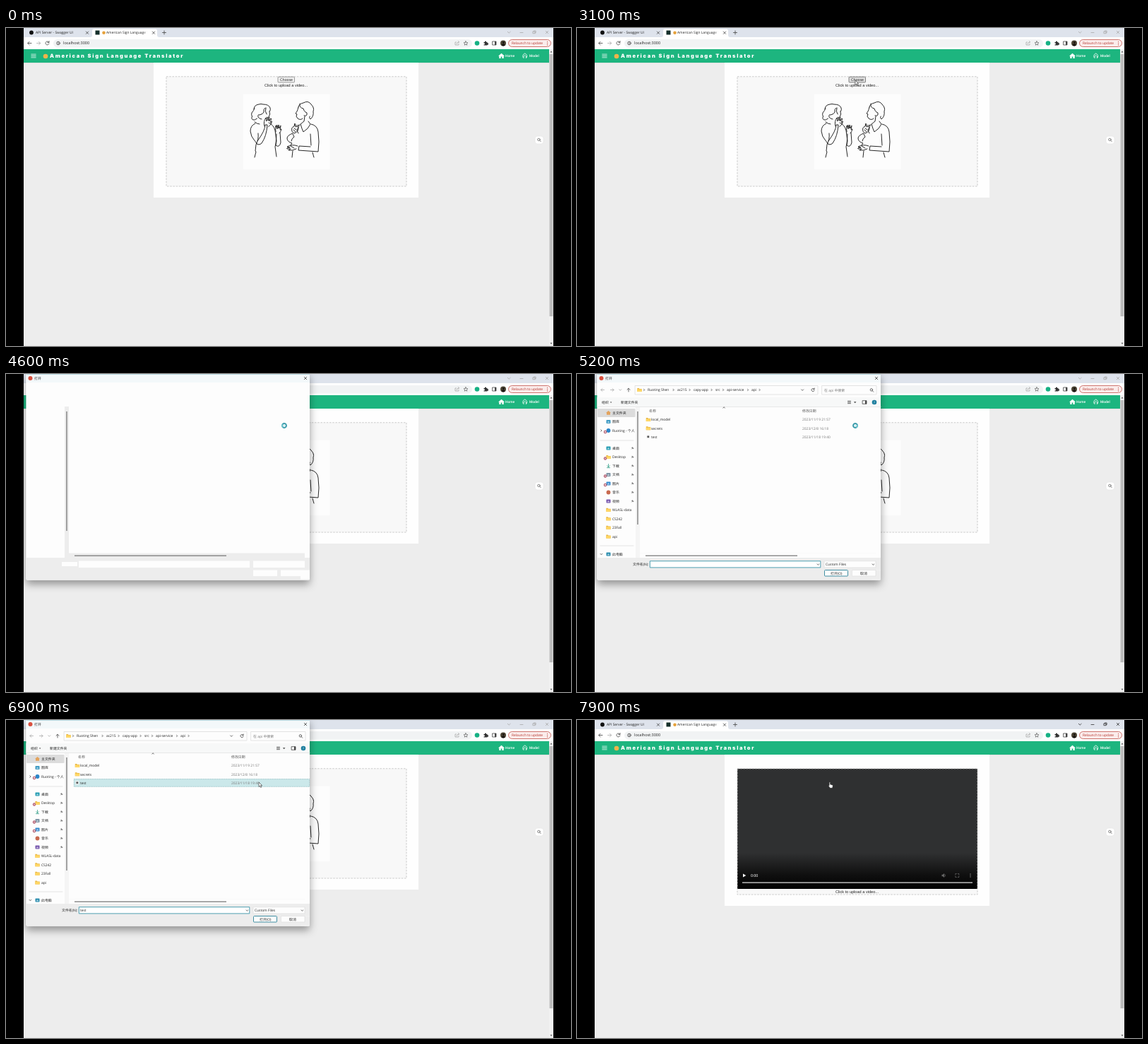
These frames come from a looping animation (800 px wide and 450 px high, 8000 ms). An HTML page:

```html
<!DOCTYPE html>
<html lang="en">
<head>
<meta charset="utf-8">
<title>Sign language translator upload</title>
<style>
  html, body { margin: 0; width: 100%; height: 100%; overflow: hidden; background: #000; }
  svg { display: block; width: 800px; height: 450px; }
  text { font: 4.9px "Open Sans", "Noto Sans CJK SC", "Noto Sans CJK", sans-serif; fill: #222; text-rendering: geometricPrecision; }
  .arial { font-family: "Liberation Sans", sans-serif; }
  .roboto { font-family: Roboto, sans-serif; }
  .line { fill: none; stroke: #444; stroke-width: .8; stroke-linecap: round; stroke-linejoin: round; }
  .dim { stroke: #aaa; }
  .white { stroke: #fff; }
  .dashed { fill: none; stroke: #c6c6c6; stroke-width: .9; stroke-dasharray: 2.6 1.6; }
  #sketch { stroke: #1c1c1c; stroke-width: .95; }
  #controls.active { stroke: #333; }
  #button { fill: #efefef; stroke: #777; stroke-width: .7; }
  #button.hover { fill: #dedede; stroke: #555; }
  #rows .date { fill: #777; }
</style>
</head>
<body>
<svg viewBox="0 0 800 450">
  <defs>
    <linearGradient id="shade" x2="0" y2="1">
      <stop offset=".7" stop-color="#2f3031"/><stop offset=".88" stop-color="#101010"/><stop offset="1" stop-color="#000"/>
    </linearGradient>
    <linearGradient id="fade" x2="1" y2="0">
      <stop stop-color="#fff" stop-opacity="0"/><stop offset=".6" stop-color="#fff"/>
    </linearGradient>
    <filter id="shadow" x="-10%" y="-10%" width="120%" height="125%">
      <feDropShadow dx="0" dy="6" stdDeviation="6" flood-opacity=".38"/>
    </filter>
    <clipPath id="screen"><path d="M25 0h750v450H25z"/></clipPath>
    <clipPath id="side"><path d="M29 46h54v214H29z"/></clipPath>
    <path id="close" d="M-1.7-1.7 1.7 1.7M1.7-1.7-1.7 1.7"/>
    <g id="folder"><path d="M-3.2-2.5h2.4l.8.9h3.2v4.1h-6.4z" fill="#e9b949"/><path d="M-3.2-.9h6.4v3.4h-6.4z" fill="#ffd766"/></g>
    <g id="lens"><circle cx="-.6" cy="-.6" r="1.7"/><path d="M.7.7 2.3 2.3"/></g>
  </defs>

  <g clip-path="url(#screen)">
    <path d="M25 0h750v450H25z" fill="#ededed"/>

    <!-- browser frame -->
    <path d="M25 0h750v14H25z" fill="#dee3ec"/>
    <path d="M25 13h750v17H25z" fill="#fff"/>
    <path d="M119 13q3 0 3-3V4q0-2.500 2.500-2.500h87q2.500 0 2.500 2.500v6q0 3 3 3z" fill="#fff"/>
    <circle cx="36" cy="6.500" r="2.900" fill="#111"/>
    <text x="42" y="8.400" font-size="5" id="tab1">API Server - Swagger UI</text>
    <path d="M126.500 3.500h6v6h-6z" fill="#16302b"/>
    <circle cx="138.500" cy="6.700" r="2.300" fill="#e6a23c"/>
    <text x="142" y="8.400">American Sign Language T</text>
    <path d="M194 3h11v8h-11z" fill="url(#fade)"/>
    <g class="line">
      <use href="#close" x="115" y="6.700"/><use href="#close" x="209" y="6.700"/>
      <path d="M221.500 6.500h5M224 4v5"/>
      <path d="M36 21.500h-5.200m2.300-2.300-2.300 2.300 2.300 2.300"/>
      <path class="dim" d="M43.500 21.500h5.200m-2.300-2.300 2.300 2.300-2.300 2.300"/>
      <path d="M60.700 20.200a2.500 2.500 0 1 0 .2 2M61 18.500v2h-2"/>
    </g>
    <rect x="67" y="16" width="593" height="11.500" rx="5.700" fill="#f1f3f4"/>
    <g class="line"><circle cx="74" cy="21.500" r="2.300"/><path d="M74 21.300v1.200M74 20.200v.1"/></g>
    <text x="81" y="23.400" style="font-size:5.500px">localhost:3000</text>
    <g class="line">
      <path class="dim" d="M637.500 20h-1.500v4h5v-1.500M638 22.500q.5-2.700 3.500-2.700m-1.300-1.300 1.400 1.300-1.400 1.300"/>
      <path d="M651 18.700l.85 1.900 2.050.2-1.550 1.400.45 2-1.800-1.050-1.800 1.050.45-2-1.550-1.400 2.050-.2z" stroke-width=".6"/>
      <path d="M689 19h5v5h-5z"/>
    </g>
    <path d="M692 19h2v5h-2z" fill="#444"/>
    <circle cx="667" cy="21.500" r="3.300" fill="#16b184"/>
    <path d="M676.500 20h1.500a1.100 1.100 0 1 1 2 0h1.500v1.500a1.100 1.100 0 1 1 0 2v1h-5v-1.300a1 1 0 1 0 0-1.700z" fill="#333"/>
    <circle cx="704" cy="21.500" r="4" fill="#4a4233"/>
    <circle cx="704.300" cy="20.600" r="1.300" fill="#17120f"/><path d="M701.600 24.500q2.600-4.500 5 0-2.500 1.800-5 0z" fill="#17120f"/>
    <rect x="711.500" y="16.500" width="60" height="10" rx="5" fill="#fbeceb" stroke="#c2544c" stroke-width=".8"/>
    <text x="716" y="23.300" style="font-size:4.850px;fill:#b3322a">Relaunch to update</text>
    <path d="M766.500 19.200v.1m0 2.200v.1m0 2.200v.1" class="line" style="stroke:#b3322a;stroke-width:1.100"/>
    <g id="controls" class="line dim">
      <path d="m710.300 5.300 1.900 1.800 1.900-1.800M728 6.500h4M746.300 4.900h2.800v2.800h-2.800zM747.300 4.900v-.9h2.800v2.800h-1"/>
      <use href="#close" x="766" y="6"/>
    </g>

    <!-- page -->
    <path d="M25 30h744v19H25z" fill="#1db57f"/>
    <path d="M25 49h744v.8H25z" fill="#000" opacity=".08"/>
    <path class="line white" d="M35.800 37.200h6.400m-6.400 2.300h6.400m-6.400 2.300h6.400"/>
    <circle cx="56" cy="40" r="3.300" fill="#efb44a"/>
    <text x="62" y="42.300" style="font:900 7.500px Inter,sans-serif;letter-spacing:1.680px;fill:#fff">American Sign Language Translator</text>
    <path d="M697 39.700l4.500-4 4.500 4h-1.300v3.300h-2.300v-2.600h-1.800v2.600h-2.300v-3.300z" fill="#fff"/>
    <g class="line white">
      <path d="M732 41.500q-1.200-3.700 2.700-5.600 3.900 1.900 2.700 5.600M733 42.600v-2.500l1.700-1.500 1.700 1.500v2.500"/>
    </g>
    <g style="font-weight:500" class="roboto">
      <text x="707" y="41.200" class="roboto" style="font-weight:500;fill:#fff">Home</text>
      <text x="741" y="41.200" class="roboto" style="font-weight:500;fill:#fff">Model</text>
    </g>
    <path d="M769 30h6v420h-6z" fill="#f1f1f1"/>
    <path d="M769.500 37h5v371h-5z" fill="#bdbdbd"/>
    <path d="M770.500 34.500l1.500-2 1.500 2zM770.500 445.500l1.500 2 1.500-2z" fill="#555"/>
    <rect x="749" y="153" width="12" height="11" rx="3.500" fill="#fff" stroke="#ddd" stroke-width=".5"/>
    <use href="#lens" x="755" y="158.500" class="line" style="stroke:#666"/>

    <g id="upload">
      <path d="M209 49h375v191H209z" fill="#fefefe"/>
      <path d="M227 69h340v155H227z" fill="#f8f8f8"/>
      <path class="dashed" d="M227 68.800h340v155.200H227z"/>
      <path d="M336 93.500h122.500v106.500H336z" fill="#fdfdfd"/>
      <g id="sketch" class="line">
        <!-- left signer -->
        <path d="M351 115q0-6 7-7 3-1 6 0 8 0 10 5 1 3-.5 5M352 113q-1 4-4 7-1 3 .5 5-2 3 1 5 3 1 6-2M367 113q-3 2-2 6-1 3-6 4-3-1-2 3 2 3 5 3M368 113q-2 5 1 9m4-4q2 4-1 8"/>
        <path d="M352 133q4 3 7 3m-6-1q-7 3-7 11 1 8 5 12l4 5M357 149q1 9-3 16l-1 9 1 1-2 8"/>
        <path d="M354 163q4 4 8 0 7-10 8-26l-3 0q0 8-11 23M366 139q-2-7 2-12l1 5q-1-6 1-6l1 5q0-6 2-5l-.5 6q2-5 3-4l-1 6 2-2q0 4-5 8"/>
        <path d="M372 134q7 3 9 11l2 15-2 8 2 14M382 147q-1-5 0-9l2 5-.5-6 2 5 .5-5 1 5 2-4-1 6 2-1q-1 4-3 6M383 150l-1 16q5 4 7-4l-1-14"/>
        <!-- right signer -->
        <path d="M414 112q1-5 7-6 7-4 11 2 5 5 3 10 1 7-4 11-2-1-1-4M416 107q-1 6 5 7 1 4 3 5 3 0 2 4-1 2-4 1M414 112q-1 4-2 6l-2 3 2 1-1 3 2 3q4 3 7 0M423 125l-1 7-5 4q2 7 4 11 7-4 10-11l-3-4"/>
        <path d="M432 136q9 2 10 11 2 14 0 28l-28-2 1-6 16 1M431 150l1 16M415 138l-3 7 2 4M416 137q-4 2-5 1"/>
        <path d="M405 146q-2-5 3-7l1-4 1 5q4-2 4 2 0 5-6 7zm3-4 3 2m-4 0 3 3M406 149q-8 3-8 7 0 5 7 7l-2 3M406 150l2 4q-4 3-4 6"/>
        <path d="M413 167q-8-3-15 1l4 1q-6 1-4 2l5 0-3 2q6 1 11-2m-8-4 5 3M406 174l-1 9M434 176l2 7"/>
      </g>
      <rect id="button" x="385" y="69.200" width="23.500" height="7.800" rx="1"/>
      <text x="388" y="75" class="arial" style="font-size:5.200px">Choose</text>
    </g>

    <g id="player">
      <path d="M209 49h375v214H209z" fill="#fefefe"/>
      <path d="M227 69h340v178H227z" fill="#f8f8f8"/>
      <path d="M227 69h340v170H227z" fill="url(#shade)"/>
      <path class="dashed" d="M227 68.800h340v178.200H227z"/>
      <path d="M235 217.500l4.300 2.500-4.300 2.500z" fill="#fff"/>
      <text x="246" y="222" class="roboto" style="font-size:5.400px;fill:#fff">0:00</text>
      <path d="M516.500 218.800h1.500l2-1.900v6.200l-2-1.900h-1.500z" fill="#666"/>
      <path class="line" style="stroke:#666" d="M521 218.500q1.300 1.500 0 3M535.800 219v-1.500h1.500m2 0h1.500v1.500m0 2v1.500h-1.500m-2 0h-1.500v-1.500"/>
      <path class="line white" stroke-width="1.200" d="M557 217.900v.1m0 1.950v.1m0 1.950v.1"/>
      <path d="M234 229.500h326v1.300H234z" fill="#ddd"/>
    </g>
    <text id="hint" x="366" class="arial" style="font-size:5.600px">Click to upload a video...</text>

    <!-- file dialog -->
    <g id="dialog">
      <rect x="28.500" y="-3" width="401.500" height="294.500" rx="2" fill="#fdfdfd" filter="url(#shadow)"/>
      <path d="M28.500 0h401.500v12H28.500z" fill="#f3f8fa"/>
      <path d="M28.500 0h401.500v.8H28.500z" fill="#a9d3dc"/>
      <circle cx="34.500" cy="6" r="3" fill="#d9503f"/>
      <text x="40" y="7.900">打开</text>
      <use href="#close" x="424" y="6" class="line"/>
      <path d="M83 46h6v214h-6zM89 253.500h334v6.500H89z" fill="#ededed" id="tracks"/>
      <path d="M28.500 260h401.500v29.500q0 2-2 2H30.500q-2 0-2-2z" fill="#ededed"/>
      <path d="M79 266h22v6H79zM103 264.500h242v9.500H103zM350 264.500h73v9.500h-73zM350 277.500h34v8.500h-34zM389 277.500h41v8.500h-41zM417 286h13v4.500h-13z" fill="#fdfdfd"/>
      <path d="M85.300 53h1.300v169h-1.300zM97 256.500h215v1.200H97z" fill="#777"/>
      <g id="files">
        <path d="M83 46h6v207.500h334v6.500H83z" fill="#fdfdfd"/>
        <path d="M83 46h6v214h-6z" fill="#f5f5f5"/>
        <path d="M85.300 53h1.300v160h-1.300zM97 256.500h215v1.200H97z" fill="#777"/>
        <path d="M28.500 33h401.500v13.500H28.500z" fill="#f7f8f8"/>
        <path d="M28.500 46.500h401.500" class="line" style="stroke:#e4e4e4"/>
        <g class="line">
          <path class="dim" d="M38.500 22.500h-4.600m2-2-2 2 2 2M47.500 22.500h4.600m-2-2 2 2-2 2M59.800 21.800l1.500 1.500 1.500-1.500"/>
          <path d="M73 25v-4.700m-2 2 2-2 2 2M317.700 21.900l1.500 1.500 1.500-1.500M335.900 21.500a2.100 2.100 0 1 0 .2 1.800m0-3.300v1.700h-1.700"/>
          <path style="stroke:#ddd" d="M82.500 16.500h258.500v12.500H82.500zM347 16.500h77v12.500h-77z"/>
          <use href="#lens" x="417.500" y="23"/>
          <path d="M383.500 38.300h4m-4 1.700h4m-4 1.700h4M404.500 37.700h5.500v4.600h-5.500zM206.800 48l1.300-1.200 1.300 1.200" />
        </g>
        <path d="M408 37.700h2v4.600h-2zM391.900 39.200h3.600l-1.800 2zM46.800 39.500h2.600l-1.300 1.500z" fill="#444"/>
        <circle cx="421" cy="40" r="3.300" fill="#1f7f9f"/>
        <text x="419.900" y="41.700" style="fill:#fff;font-size:4.500px">?</text>
        <use href="#folder" x="88.500" y="22.500"/>
        <g id="path"></g>
        <text x="350" y="24.500" style="fill:#777">在 api 中搜索</text>
        <text x="35" y="42">组织</text><text x="62" y="42">新建文件夹</text>
        <text x="102" y="53.500" style="fill:#555">名称</text><text x="319" y="53.500" style="fill:#555">修改日期</text>
        <path id="hover" d="M96 71.300h334v10.900H96z" fill="#e6f4f6"/>
        <path id="selected" d="M96.300 83.600h333.400v10.700H96.300z" fill="#cbe8ea" stroke="#7fb3b8" stroke-width=".7" stroke-dasharray="1.500 1"/>
        <g id="rows"></g>
        <g id="sidebar" clip-path="url(#side)"></g>
        <path d="M79 266h22v6H79zM417 286h13v4.500h-13zM423 277.500h7v8.500h-7z" fill="#ededed"/>
        <text x="79" y="271.300">文件名(N):</text>
        <path d="M103.300 264.700h241.500v9.200H103.300z" fill="#fff" stroke="#3a93a8" stroke-width=".9"/>
        <path d="M350 264.700h73v9.200h-73zM389.500 277.500h33.500v8.500h-33.500z" fill="#fdfdfd" stroke="#d8d8d8" stroke-width=".6"/>
        <rect x="350.500" y="277.500" width="33" height="8.500" rx="1" fill="#fdfdfd" stroke="#2b8298" stroke-width=".9"/>
        <path class="line" d="M340 268.900l1.400 1.300 1.400-1.300M418 268.900l1.400 1.300 1.400-1.300"/>
        <text x="352" y="271.200">Custom Files</text>
        <text x="359" y="283.500">打开(O)</text><text x="401" y="283.500">取消</text>
        <text id="filename" x="105" y="271.200">test</text>
      </g>
    </g>

    <g id="cursor">
      <path id="arrow" d="M0 0v6.500l1.500-1.300 1.100 2.300 1.100-.5-1.100-2.300h2z" fill="#fff" stroke="#222" stroke-width=".6"/>
      <g id="busy"><circle r="3" fill="#d9f0f2" stroke="#3b9bab" stroke-width="1.900"/><path d="M0-3a3 3 0 0 1 3 3" fill="none" stroke="#6fc3cd" stroke-width="1.900"/></g>
      <path id="hand" d="M-.9.200q.8-.8 1.500 0V3l3 .9q.9.300.7 1.400l-.6 3H.2L-2 5q.3-1 1.100-.2z" fill="#fff" stroke="#222" stroke-width=".6"/>
    </g>
  </g>
</svg>
<script>
const LOOP = 8000;
const $ = id => document.getElementById(id);
const show = (id, on) => { $(id).style.display = on ? "" : "none"; };
const label = (s, x, y, cls = "") => `<text x="${x}" y="${y}" class="${cls}">${s}</text>`;
const folder = (x, y) => `<use href="#folder" x="${x}" y="${y}"/>`;
const stroke = d => `<path class="line" d="${d}"/>`;
const rule = y => `<path class="line" style="stroke:#ddd" d="M33 ${y}h47"/>`;

$("path").innerHTML = [["Ruoting Shen", 100, 136], ["ac215", 142, 159], ["capy-app", 165, 190],
  ["src", 196, 206.5], ["api-service", 212, 241.5], ["api", 247, 258]]
  .map(([s, x, end]) => label(s, x, 24.4) + stroke(`M${end} 21.300l1.200 1.200-1.200 1.200`)).join("")
  + stroke("M94.500 21.300l1.200 1.200-1.200 1.200");

$("rows").innerHTML = [["local_model", "2023/11/19 21:57"], ["secrets", "2023/12/8 16:18"], ["test", "2023/11/18 19:40"]]
  .map(([name, date], i) => {
    const y = 64.6 + i * 12.1;
    const icon = i < 2 ? folder(101, y)
      : `<path d="M98.600 ${y - 2.5}h4.400v5h-4.400z" fill="#eee"/><circle cx="100.800" cy="${y}" r="1.500" fill="#555"/>`;
    return icon + label(name, 105, y + 1.8) + label(date, 319, y + 1.8, "date");
  }).join("");

// label, centre y, icon colour (none = folder), pinned, sync badge
const places = [["主文件夹", 55, "#e3a35c"], ["图库", 67.5, "#3f9bc4"], ["Ruoting - 个人", 80, "#2c86c9", 0, 1],
  ["桌面", 105, "#2b9fb5", 1], ["Desktop", 117.5, "", 1, 1], ["下载", 130, "#2f9e86", 1],
  ["文档", 142.5, "#7f95a6", 1, 1], ["图片", 155, "#3f8fd0", 1, 1], ["音乐", 167.5, "#c8694f", 1], ["视频", 180, "#7a5bb0", 1],
  ["WLASL-data", 192.3], ["CS242", 204.8], ["23Fall", 217.2], ["api", 230], ["此电脑", 255, "#2f8fb0"]];

function placeIcon(name, y, color) {
  if (!color) return folder(44.5, y);
  if (name === "主文件夹") return `<path d="M41 ${y}l3.500-3 3.500 3h-1v2.800h-5v-2.800z" fill="${color}"/>`;
  if (name === "下载") return `<path d="M44.500 ${y - 2.5}v4m-1.800-1.600 1.800 1.700 1.800-1.700m-3.800 2.700h4" class="line" style="stroke:${color}"/>`;
  if (name === "音乐" || name.startsWith("Ruo")) return `<circle cx="44.500" cy="${y}" r="2.900" fill="${color}"/>`;
  return `<rect x="41.500" y="${y - 2.5}" width="6" height="5" rx=".8" fill="${color}"/><path d="M42.700 ${y + 1.3}l1.700-2 2 2z" fill="#fff" opacity=".7"/>`;
}

$("sidebar").innerHTML = `<rect x="29" y="49" width="53.500" height="12" rx="1" fill="#dcdcdc"/>`
  + places.map(([name, y, color, pinned, badge]) => placeIcon(name, y, color)
    + (badge ? `<circle cx="40" cy="${y + 2}" r="2.200" fill="#b0566a"/><path class="line white" d="M39.300 ${y + 1.3}l1.400 1.400m0-1.400-1.400 1.400" stroke-width=".5"/>` : "")
    + (pinned ? `<path d="M78.300 ${y - 1.600}l2 2-1.600.4-1.200-1.200zM78.200 ${y + .3}l-1.200 1.300" fill="#777" stroke="#777" stroke-width=".5"/>` : "")
    + label(name, 50, y + 1.8)).join("")
  + rule(94) + rule(243) + stroke("M33.800 78.800l1.200 1.200-1.200 1.200M33 254.300l1.400 1.400 1.400-1.400");

const track = [[700, 740, 406], [800, 412, 82], [1000, 412, 82], [1800, 414, 66], [2100, 394, 74], [5300, 394, 74],
  [5900, 382, 79], [6300, 358, 88], [8000, 358, 88]];

function cursorAt(t) {
  const i = Math.max(1, track.findIndex(k => k[0] >= t));
  const [t0, x0, y0] = track[i - 1], [t1, x1, y1] = track[i];
  const u = Math.max(0, (t - t0) / (t1 - t0));
  return [x0 + (x1 - x0) * u, y0 + (y1 - y0) * u];
}

function draw(now) {
  const t = Math.floor(now % LOOP / 100) * 100;
  const playing = t >= 7600, open = t >= 4500 && t < 7200;
  const busy = t >= 4200 && t < 5300;
  const [x, y] = cursorAt(t);

  show("upload", !playing);
  show("player", playing);
  $("hint").setAttribute("y", playing ? 244.6 : 83.3);
  $("button").classList.toggle("hover", t >= 2000);
  $("controls").classList.toggle("active", t >= 7200);

  show("dialog", open);
  show("files", t >= 4900);
  show("hover", t >= 5700 && t < 6100);
  show("selected", t >= 6400);
  show("filename", t >= 6400);

  show("cursor", t >= 700);
  show("arrow", !busy && !playing);
  show("busy", busy);
  show("hand", playing);
  $("cursor").setAttribute("transform", `translate(${x} ${busy ? y - 1 : y})`);
  $("busy").setAttribute("transform", `rotate(${t * .36})`);
  requestAnimationFrame(draw);
}
requestAnimationFrame(draw);
</script>
</body>
</html>
```
